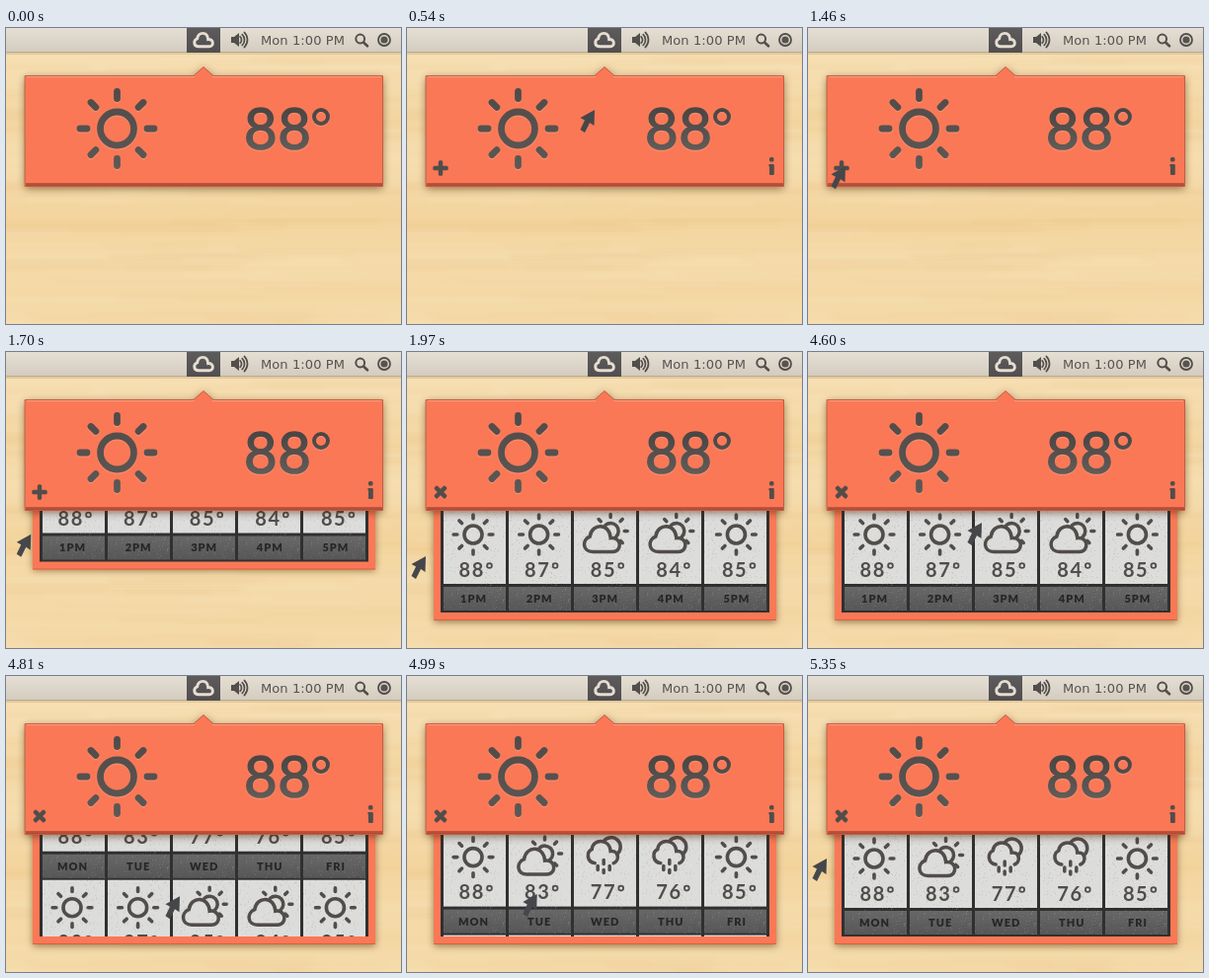
Animation of 400x300 px, one loop 8 s. Source, as an HTML page with a canvas:

```html
<!DOCTYPE html>
<html lang="en">
<head>
<meta charset="utf-8">
<title>Weather menu</title>
<style>
html, body { margin: 0; width: 100%; height: 100%; overflow: hidden; background: #f3d9a8; }
canvas { display: block; width: 400px; height: 300px; }
</style>
</head>
<body>
<canvas id="stage" width="400" height="300"></canvas>
<script>
const LOOP = 8000, TAU = Math.PI * 2;
const INK = '#514d4b', CORAL = '#fa7856';
const PAGE = 107, SLIDE = 112;
const ctx = document.getElementById('stage').getContext('2d');

const HOURS = { labels: ['1PM', '2PM', '3PM', '4PM', '5PM'], temps: [88, 87, 85, 84, 85], icons: ['sun', 'sun', 'cloudy', 'cloudy', 'sun'] };
const DAYS = { labels: ['MON', 'TUE', 'WED', 'THU', 'FRI'], temps: [88, 83, 77, 76, 85], icons: ['sun', 'cloudy', 'rain', 'rain', 'sun'] };

// time, x, y of the pointer tip
const POINTER = [
  [60, -4, 213], [540, 190, 83], [1010, 190, 83], [1430, 38, 140], [1460, 38, 140],
  [1820, 19, 207], [3969, 19, 207], [3970, 27, 205], [4560, 176, 173], [4620, 176, 173],
  [4810, 176, 223], [4850, 176, 235], [5350, 19, 185]
];

const span = (t, a, b) => Math.min(1, Math.max(0, (t - a) / (b - a)));
const ease = p => (1 - Math.cos(Math.PI * p)) / 2;

function pointerAt(t) {
  let i = 0;
  while (i < POINTER.length - 2 && t >= POINTER[i + 1][0]) i++;
  const [ta, xa, ya] = POINTER[i], [tb, xb, yb] = POINTER[i + 1];
  const p = span(t, ta, tb);
  return [xa + (xb - xa) * p, ya + (yb - ya) * p];
}

function seeded(seed) {
  return () => (seed = (seed * 16807) % 2147483647) / 2147483647;
}

function layer(w, h, paint) {
  const c = document.createElement('canvas');
  c.width = w;
  c.height = h;
  paint(c.getContext('2d'));
  return c;
}

function gradient(g, y0, y1, ...colors) {
  const fill = g.createLinearGradient(0, y0, 0, y1);
  colors.forEach((c, i) => fill.addColorStop(i / (colors.length - 1), c));
  return fill;
}

function rect(x, y, w, h, color) {
  ctx.fillStyle = color;
  ctx.fillRect(x, y, w, h);
}

function line(x0, y0, x1, y1) {
  ctx.beginPath();
  ctx.moveTo(x0, y0);
  ctx.lineTo(x1, y1);
  ctx.stroke();
}

function ring(x, y, r, from = 0, to = TAU) {
  ctx.beginPath();
  ctx.arc(x, y, r, from, to);
  ctx.stroke();
}

function at(x, y, scale, draw) {
  ctx.save();
  ctx.translate(x, y);
  ctx.scale(scale, scale);
  draw();
  ctx.restore();
}

function text(str, x, y, font, color, spacing = 0, align = 'left') {
  ctx.font = font;
  ctx.fillStyle = color;
  ctx.letterSpacing = spacing + 'px';
  ctx.textAlign = align;
  ctx.fillText(str, x, y);
  ctx.letterSpacing = '0px';
}

function shade(color, blur, dy) {
  ctx.shadowColor = color;
  ctx.shadowBlur = blur;
  ctx.shadowOffsetY = dy;
}

const wood = layer(400, 300, g => {
  g.fillStyle = gradient(g, 25, 300, '#f6dfb3', '#f5dbab', '#f3d5a0', '#f6deb0', '#f4d8a6', '#f3d39b', '#f5dbaa', '#f4d8a5', '#f5dcac');
  g.fillRect(0, 0, 400, 300);
  const rnd = seeded(41);
  g.filter = 'blur(2px)';
  for (let i = 0; i < 130; i++) {
    g.fillStyle = rnd() < 0.5 ? 'rgba(214,160,86,.08)' : 'rgba(255,238,203,.18)';
    g.fillRect(rnd() * 400 - 130, 26 + rnd() * 274, 80 + rnd() * 250, 1 + rnd() * 3);
  }
});

const grain = layer(63, 105, g => {
  const rnd = seeded(7);
  for (let i = 0; i < 500; i++) {
    g.fillStyle = rnd() < 0.5 ? 'rgba(255,255,255,.14)' : 'rgba(0,0,0,.09)';
    g.fillRect(Math.floor(rnd() * 63), Math.floor(rnd() * 105), 1, 1);
  }
});

function sun() {
  ctx.lineWidth = 6.8;
  ctx.lineCap = 'round';
  ring(0, 0, 17);
  for (let i = 0; i < 8; i++) {
    const c = Math.cos(i * TAU / 8), s = Math.sin(i * TAU / 8);
    line(30.5 * c, 30.5 * s, 37.5 * c, 37.5 * s);
  }
}

function cloudOutline() {
  ctx.beginPath();
  ctx.moveTo(-12, 17.5);
  ctx.bezierCurveTo(-23, 17.5, -23, 5, -15, 2);
  ctx.bezierCurveTo(-13, -12, 5, -12, 6, 3.5);
  ctx.bezierCurveTo(17.5, 2, 18, 17.5, 8, 17.5);
  ctx.closePath();
  ctx.stroke();
}

function cloudy() {
  ctx.lineWidth = 3.5;
  ctx.lineCap = 'round';
  cloudOutline();
  ring(6, -3.5, 8, -2.3, 0.95);
  for (let i = 0; i < 5; i++) {
    const a = -2.36 + i * TAU / 8, c = Math.cos(a), s = Math.sin(a);
    line(6 + 14 * c, -3.5 + 14 * s, 6 + 17 * c, -3.5 + 17 * s);
  }
}

function rain() {
  ctx.lineWidth = 3.5;
  ctx.lineCap = 'round';
  ctx.beginPath();
  ctx.moveTo(-10, 6);
  ctx.bezierCurveTo(-18, 5, -19, -5, -13, -8);
  ctx.bezierCurveTo(-12, -19, 5, -19, 6, -6);
  ctx.bezierCurveTo(15, -7, 15, 4, 9, 6);
  ctx.stroke();
  ring(6.5, -10.5, 9.5, -2.4, 0.9);
  for (const [x, y, h] of [[-7, 9, 4], [-1, 3, 4], [-1, 13, 3], [5, 9, 4]]) line(x, y, x, y + h);
}

const ICONS = { sun: [sun, 0.53], cloudy: [cloudy, 1], rain: [rain, 1] };

function menuBar() {
  rect(0, 0, 400, 25, gradient(ctx, 0, 25, '#e5dfd4', '#d3cbbe'));
  rect(0, 24, 400, 1, '#b9aa94');
  rect(0, 25, 400, 2, 'rgba(120,80,30,.15)');
  rect(183, 0, 34, 25, gradient(ctx, 0, 25, '#5e5b5b', '#504e50'));
  ctx.strokeStyle = '#e6ddd2';
  ctx.lineWidth = 5.6;
  at(201.5, 9.7, 0.52, cloudOutline);

  ctx.fillStyle = ctx.strokeStyle = '#514e4b';
  ctx.lineCap = 'round';
  ctx.beginPath();
  ctx.moveTo(228, 9);
  ctx.lineTo(231, 9);
  ctx.lineTo(236, 5);
  ctx.lineTo(236, 19);
  ctx.lineTo(231, 15);
  ctx.lineTo(228, 15);
  ctx.fill();
  ctx.lineWidth = 1.7;
  ring(234, 12, 4.5, -0.8, 0.8);
  ring(234, 12, 7.5, -0.8, 0.8);
  ring(234, 12, 10.5, -0.8, 0.8);
  text('Mon 1:00 PM', 258, 17, '13px "DejaVu Sans", sans-serif', '#57534f', 0.1);
  ctx.lineWidth = 2;
  ring(358.7, 11, 4.4);
  ctx.lineWidth = 2.6;
  line(362.5, 15, 366, 18.3);
  ctx.lineWidth = 1.8;
  ring(383, 12, 6);
  ctx.beginPath();
  ctx.arc(383, 12, 3.6, 0, TAU);
  ctx.fill();
}

function page(data, top) {
  for (let i = 0; i < 5; i++) {
    const x = 37 + 66 * i, mid = 67 + 66.6 * i;
    rect(x, top, 63, 78, '#dcdcdb');
    rect(x, top + 81, 63, 24, gradient(ctx, top + 81, top + 105, '#686868', '#575757'));
    ctx.drawImage(grain, x, top);
    const [draw, scale] = ICONS[data.icons[i]];
    ctx.strokeStyle = INK;
    at(mid, top + 28, scale, draw);
    text(data.temps[i], mid - 14.5, top + 70.5, 'bold 20px Lato, sans-serif', INK, 1.6);
    ctx.lineWidth = 1.8;
    ring(mid + 16.5, top + 59.5, 2.4);
    text(data.labels[i], mid + 0.5, top + 97, '900 11px Lato, sans-serif', '#262626', 1, 'center');
  }
}

function sheet(drop, scroll) {
  if (drop <= 0) return;
  ctx.save();
  ctx.beginPath();
  ctx.rect(0, 150, 400, 150);
  ctx.clip();
  ctx.translate(0, drop - SLIDE);
  ctx.save();
  shade('rgba(80,45,10,.55)', 7, 2);
  rect(27, 140, 347, 132, CORAL);
  ctx.restore();
  rect(27, 271, 347, 1, '#d9603f');
  rect(34, 140, 333, 124, '#303030');
  ctx.beginPath();
  ctx.rect(34, 140, 333, 124);
  ctx.clip();
  page(HOURS, 157 + scroll);
  page(DAYS, 157 + scroll - PAGE);
  ctx.restore();
}

function panelPath() {
  ctx.beginPath();
  ctx.moveTo(19.5, 48.5);
  ctx.lineTo(190, 48.5);
  ctx.lineTo(200, 39.5);
  ctx.lineTo(210, 48.5);
  ctx.lineTo(381.5, 48.5);
  ctx.lineTo(381.5, 160.5);
  ctx.lineTo(19.5, 160.5);
  ctx.closePath();
}

function panel(iconAlpha, turn) {
  ctx.save();
  shade('rgba(70,40,10,.6)', 8, 2);
  panelPath();
  ctx.fillStyle = CORAL;
  ctx.fill();
  ctx.restore();
  rect(20, 157, 361, 4, gradient(ctx, 157, 161, '#c25740', '#a5432f'));
  ctx.lineWidth = 1;
  ctx.strokeStyle = '#c95b40';
  panelPath();
  ctx.stroke();
  rect(21, 49, 170, 1, '#ffa184');
  rect(209, 49, 171, 1, '#ffa184');

  ctx.save();
  shade('rgba(255,190,160,.4)', 1, 1);
  ctx.strokeStyle = gradient(ctx, -41, 41, '#504a48', '#5d5855');
  at(112.5, 102, 1, sun);
  const ink = gradient(ctx, 82, 124, '#4a4543', '#625c59');
  const font = '58px Lato, sans-serif';
  ctx.strokeStyle = ink;
  ctx.lineWidth = 4;
  ring(319, 90, 7);
  ctx.lineWidth = 1.6;
  ctx.lineJoin = 'round';
  ctx.font = font;
  ctx.letterSpacing = '0.6px';
  ctx.strokeText('88', 241, 123);
  shade('transparent', 0, 0);
  text('88', 241, 123, font, ink, 0.6);

  ctx.globalAlpha = iconAlpha;
  ctx.fillStyle = INK;
  at(34, 142, 1, () => {
    ctx.rotate(turn * Math.PI / 4);
    ctx.beginPath();
    ctx.roundRect(-7.7, -2.2, 15.4, 4.4, 1.5);
    ctx.roundRect(-2.2, -7.7, 4.4, 15.4, 1.5);
    ctx.fill();
  });
  ctx.beginPath();
  ctx.roundRect(367, 131, 4.5, 4.5, 1.5);
  ctx.roundRect(367, 138, 4.8, 11, 1);
  ctx.roundRect(366.3, 138, 4, 2.5, 1);
  ctx.fill();
  ctx.restore();
}

function pointer(x, y) {
  if (x < 0) return;
  at(x, y, 1, () => {
    ctx.beginPath();
    for (const [px, py] of [[0, 0], [-14.5, 8], [-10, 10.5], [-14.5, 20], [-10, 23], [-5, 13], [-0.5, 16]]) ctx.lineTo(px, py);
    ctx.closePath();
    ctx.fillStyle = '#45474a';
    ctx.fill();
  });
}

function draw(t) {
  const drop = SLIDE * ease(span(t, 1475, 1905));
  const scroll = PAGE * ease(span(t, 4620, 5020));
  ctx.drawImage(wood, 0, 0);
  menuBar();
  sheet(drop, scroll);
  panel(span(t, 240, 540), ease(span(t, 1760, 1950)));
  pointer(...pointerAt(t));
}

const start = performance.now();
function tick() {
  draw((performance.now() - start) % LOOP);
  requestAnimationFrame(tick);
}
tick();
</script>
</body>
</html>
```
